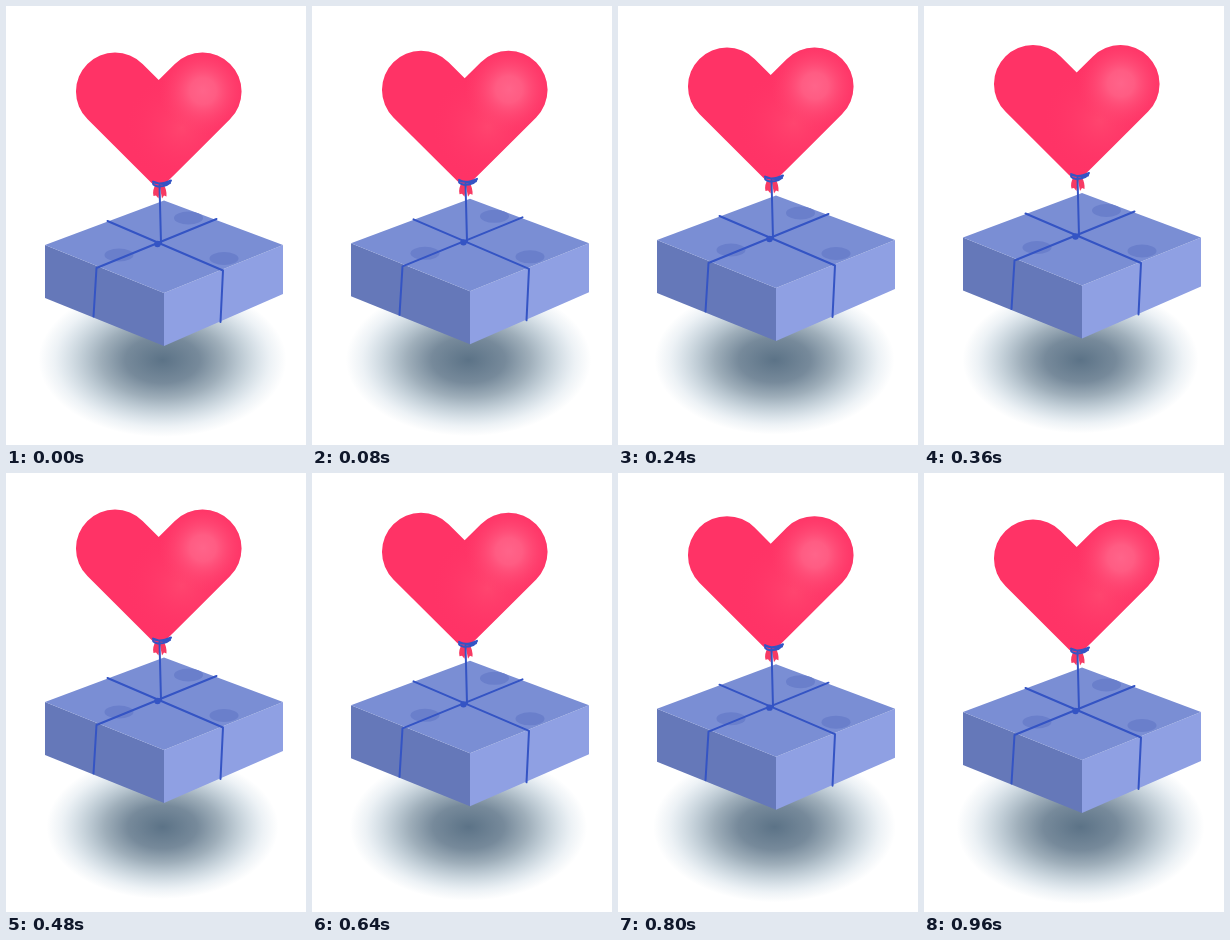
These frames come from a looping animation (300 px wide and 439 px high, 1000 ms). An HTML page:

```html
<!DOCTYPE html>
<html lang="en">
<head>
<meta charset="utf-8">
<title>Balloon gift</title>
<style>
  html, body { margin: 0; width: 100%; height: 100%; overflow: hidden; background: #fff; }
  svg { display: block; width: 100%; height: 100%; }
  .cord { fill: none; stroke: #3454c4; stroke-width: 2; stroke-linecap: round; stroke-linejoin: round; }
</style>
</head>
<body>
<svg viewBox="0 0 300 439">
  <defs>
    <radialGradient id="shade">
      <stop offset="0" stop-color="#1c3c58" stop-opacity=".72"/>
      <stop offset=".3" stop-color="#1c3c58" stop-opacity=".6"/>
      <stop offset=".5" stop-color="#20445f" stop-opacity=".43"/>
      <stop offset=".7" stop-color="#2a5878" stop-opacity=".24"/>
      <stop offset=".87" stop-color="#3a7098" stop-opacity=".09"/>
      <stop offset="1" stop-color="#3a7098" stop-opacity="0"/>
    </radialGradient>
    <radialGradient id="shine" gradientUnits="userSpaceOnUse" cx="197" cy="85" r="44">
      <stop offset="0" stop-color="#ff648a"/>
      <stop offset=".3" stop-color="#ff5c83"/>
      <stop offset="1" stop-color="#ff3f6c" stop-opacity="0"/>
    </radialGradient>
    <radialGradient id="glow" gradientUnits="userSpaceOnUse" cx="176" cy="122" r="58">
      <stop offset="0" stop-color="#ff456f"/>
      <stop offset="1" stop-color="#ff3366" stop-opacity="0"/>
    </radialGradient>
    <path id="heart" d="M152.700 74L136.600 57.900A39 39 0 1 0 81.400 113.100L145.500 177Q153 182 160 177L224.100 113.100A39 39 0 1 0 168.900 57.900Z"/>
  </defs>

  <ellipse id="shadow" cx="156.500" cy="354" fill="url(#shade)"/>

  <g id="gift">
    <path fill="#6578b9" d="M39 239L158 287V340L39 292Z"/>
    <path fill="#8fa0e3" d="M158 287L277 239V288L158 340Z"/>
    <path fill="#7a8ed4" d="M39 239L158 194.500L277 239L158 287Z"/>
    <g fill="#6a7fcb">
      <ellipse cx="182.500" cy="212" rx="14.500" ry="6.500"/>
      <ellipse cx="113" cy="249" rx="14.500" ry="6.500"/>
      <ellipse cx="218" cy="252.500" rx="14.500" ry="6.500"/>
    </g>
    <path class="cord" d="M101.500 215L217 264.500L214.500 316M210.500 213L90.500 262L87.500 310.500"/>

    <path fill="#f73a63" d="M150 178Q146 184 147.500 190L150 189.500L152.500 192.500L154 182L156 192.500L158 189.500L160.500 190.500Q161 184 157.500 178Z"/>
    <use href="#heart" fill="#ff3366"/>
    <use href="#heart" fill="url(#glow)"/>
    <use href="#heart" fill="url(#shine)"/>

    <path class="cord" d="M153.500 179L155 237"/>
    <path class="cord" d="M147 175.500Q153 180 165 174.500Q163 180.500 152 180.500Q145 179 148 176Q156 179.500 164 177"/>
    <circle cx="151.500" cy="238" r="3.200" fill="#3454c4"/>
  </g>
</svg>
<script>
  const gift = document.getElementById('gift');
  const shadow = document.getElementById('shadow');
  const STEP = 40, LOOP = 1000, PEAK = 480;

  function draw(now) {
    const t = Math.floor((now % LOOP) / STEP) * STEP;
    const lift = 1 - Math.abs(t - PEAK) / PEAK;
    gift.setAttribute('transform', `translate(0 ${-10 * lift})`);
    shadow.setAttribute('rx', 124 - 8 * lift);
    shadow.setAttribute('ry', 77 - 5 * lift);
  }

  let start;
  function tick(now) {
    start ??= now;
    draw(now - start);
    requestAnimationFrame(tick);
  }
  draw(0);
  requestAnimationFrame(tick);
</script>
</body>
</html>
```
